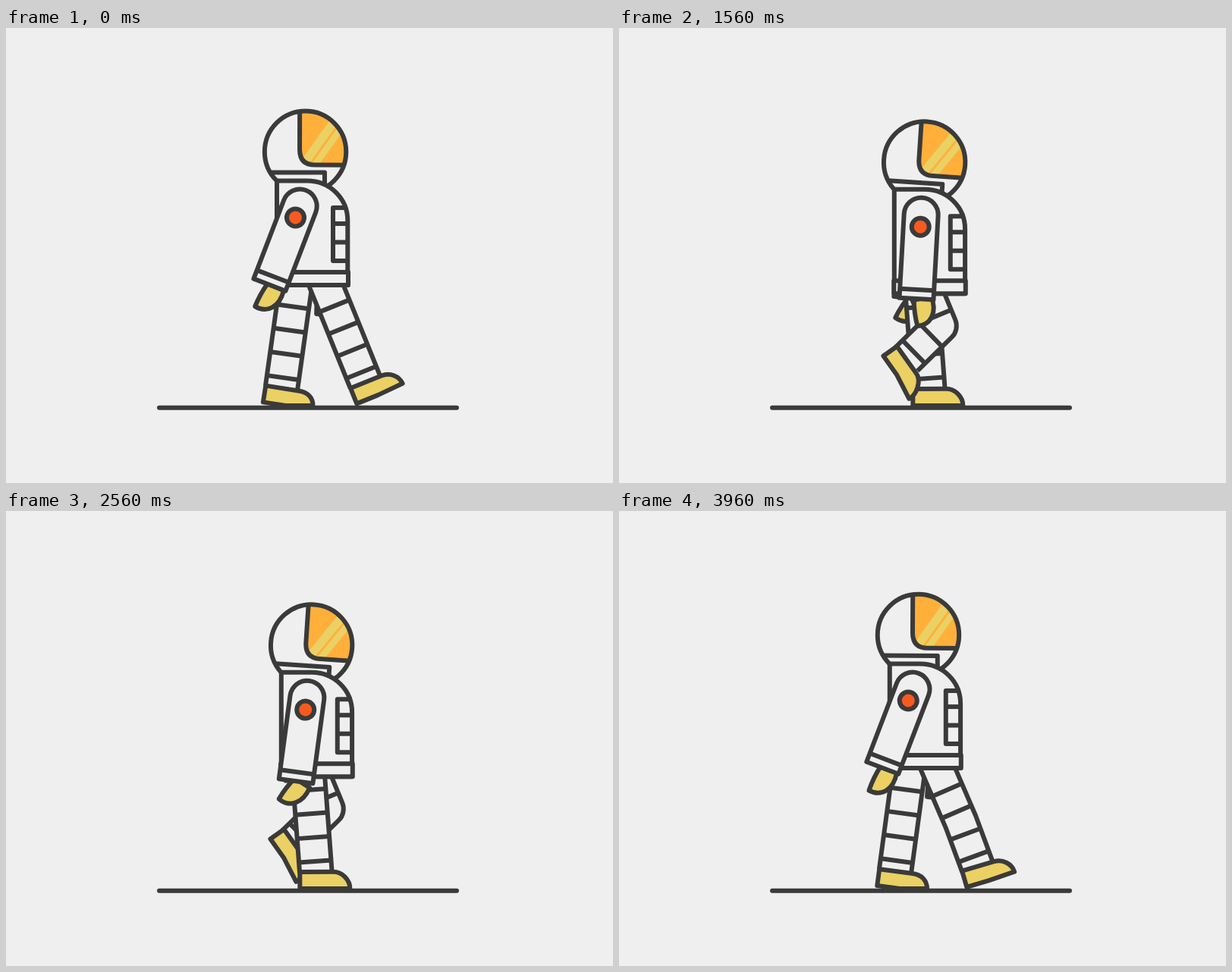
Animation of 800 by 600 pixels, one loop 4000 ms. Source, as an HTML page with a canvas:

```html
<!DOCTYPE html>
<html lang="en">
<head>
<meta charset="utf-8">
<title>Walking astronaut</title>
<style>
html, body { margin: 0; width: 100%; height: 100%; overflow: hidden; background: #efefef; }
canvas { display: block; }
</style>
</head>
<body>
<canvas id="stage" width="800" height="600"></canvas>
<script>
const ctx = document.getElementById('stage').getContext('2d');
const INK = '#3a3a3a', SUIT = '#efefef', YELLOW = '#ebd064', ORANGE = '#ffb03b', RED = '#f75a20';
const LOOP = 4000, CYCLE = 2000, STEP = 1000, LINE = 6, FLOOR = 498;
const TAU = Math.PI * 2;

const rad = deg => deg * Math.PI / 180;
const mod = (a, n) => ((a % n) + n) % n;
const clamp = v => Math.min(1, Math.max(0, v));
const ease = u => (1 - Math.cos(Math.PI * clamp(u))) / 2;
const swell = t => ease(2 * mod(t, STEP) / STEP <= 1 ? 2 * mod(t, STEP) / STEP : 2 - 2 * mod(t, STEP) / STEP);

function turn(x, y, deg) {
  const c = Math.cos(rad(deg)), s = Math.sin(rad(deg));
  return [x * c - y * s, x * s + y * c];
}

// A leg spends one step on the ground moving back, and one step swinging forward.
function gait(time) {
  const t = mod(time, CYCLE), swinging = t >= STEP, u = (t % STEP) / STEP;
  const arch = swinging ? Math.sin(Math.PI * u) : 0;
  const lift = arch ** 2.5;
  const travel = 0.85 * ease(u) + 0.15 * u;
  const reach = swinging ? travel : 1 - travel;

  const thigh = 8 - 30 * reach - 13 * arch;
  const shin = thigh + 70 * arch ** 1.5;
  const pitch = swinging ? shin + 9 * arch ** 0.4 : shin * Math.cos(Math.PI * u) ** 2;
  const toeFree = swinging ? clamp((u - 0.1) / 0.35) : Number(pitch < 0);

  // The sole rolls on the heel when tipped up and on the ball when tipped down.
  const roll = pitch < 0 ? -28 : 9;
  const soleDrop = turn(roll, 22, pitch)[1];
  return {
    x: 363 + 110.5 * reach - 52 * lift,
    y: FLOOR - soleDrop - 43 * lift,
    thigh, shin, pitch,
    toe: pitch * 1.15 * toeFree
  };
}

function nearArm(time) {
  const t = mod(time, LOOP);
  const swing = (from, to) => ease((t - from) / (to - from));
  return 21 - 37 * (swing(0, 1080) - swing(1080, 2020) + swing(2200, 3080) - swing(3080, 3980));
}

const farArm = t => 5 - 16 * Math.cos(TAU * (t - 90) / CYCLE);

function paint(fill) {
  if (fill) { ctx.fillStyle = fill; ctx.fill(); }
  ctx.strokeStyle = INK;
  ctx.lineWidth = LINE;
  ctx.stroke();
}

function polyline(points, width = LINE, color = INK) {
  ctx.beginPath();
  points.forEach(p => ctx.lineTo(p[0], p[1]));
  ctx.lineWidth = width;
  ctx.strokeStyle = color;
  ctx.stroke();
}

function drawFoot({ x, y, pitch, toe }) {
  const ball = turn(9, 22, pitch);
  const heel = (px, py) => turn(px, py, pitch);
  const tip = (px, py) => {
    const v = turn(px, py, toe);
    return [ball[0] + v[0], ball[1] + v[1]];
  };
  ctx.save();
  ctx.translate(x, y);
  ctx.beginPath();
  ctx.moveTo(...heel(-21, 0));
  ctx.lineTo(...heel(23, 0));
  ctx.bezierCurveTo(...heel(35, 0), ...tip(36, -11), ...tip(36, 0));
  ctx.lineTo(...ball);
  ctx.lineTo(...heel(-21, 22));
  ctx.closePath();
  paint(YELLOW);
  ctx.restore();
}

function drawLeg(t) {
  const pose = gait(t);
  const above = (p, dist, side, deg) => {
    const v = turn(side, -dist, deg);
    return [p[0] + v[0], p[1] + v[1]];
  };
  const ankle = [pose.x, pose.y];
  const knee = above(ankle, 63, 0, pose.shin);
  const bones = [above(knee, 100, 0, pose.thigh), knee, ankle];
  polyline(bones, 48.5);
  polyline(bones, 36.5, SUIT);
  for (const dist of [14, 45.5]) {
    for (const [joint, deg] of [[ankle, pose.shin], [knee, pose.thigh]]) {
      polyline([above(joint, dist, -21, deg), above(joint, dist, 21, deg)]);
    }
  }
  drawFoot(pose);
}

function drawHand(deg) {
  ctx.save();
  ctx.translate(5, 112);
  ctx.rotate(rad(deg));
  ctx.translate(-5, -112);
  ctx.beginPath();
  ctx.moveTo(-3, 110);
  ctx.quadraticCurveTo(-8, 126, -9, 144);
  ctx.bezierCurveTo(9, 148, 22, 134, 20, 112);
  ctx.closePath();
  paint(YELLOW);
  ctx.restore();
}

function drawArm(angle, t) {
  const deg = angle(t);
  ctx.save();
  ctx.translate(387.2 + (21 - deg) * 0.29, 235);
  ctx.rotate(rad(deg));
  // The hand trails the recent motion of the arm.
  drawHand(8.5 * (angle(t - 70) - angle(t - 30)));
  ctx.beginPath();
  ctx.arc(0, 0, 22.5, Math.PI, 0);
  ctx.lineTo(22.5, 111);
  ctx.lineTo(-22.5, 111);
  ctx.closePath();
  paint(SUIT);
  polyline([[-22.5, 99], [22.5, 99]]);
  ctx.beginPath();
  ctx.arc(0, 16, 11.5, 0, TAU);
  paint(RED);
  ctx.restore();
}

function drawTorso() {
  ctx.beginPath();
  ctx.moveTo(357, 201.5);
  ctx.lineTo(397, 201.5);
  ctx.bezierCurveTo(427, 201.5, 450.3, 225, 450.3, 254);
  ctx.lineTo(450.3, 339);
  ctx.lineTo(357, 339);
  ctx.closePath();
  paint(SUIT);
  ctx.beginPath();
  ctx.rect(356.5, 322, 94.5, 17);
  paint(SUIT);
  polyline([[450, 237], [431, 237], [431, 307], [450, 307]]);
  [258, 282.5].forEach(y => polyline([[431, y], [450, y]]));
}

function visorPath() {
  ctx.beginPath();
  ctx.moveTo(387, 100);
  ctx.lineTo(387, 160);
  ctx.quadraticCurveTo(387, 180.5, 407, 180.5);
  ctx.lineTo(460, 180.5);
}

function drawHelmet(t) {
  ctx.save();
  ctx.translate(357, 200);
  ctx.rotate(rad(3.8 * swell(t - 50)));
  ctx.translate(-357, -200);
  const shell = () => { ctx.beginPath(); ctx.arc(394.5, 163.2, 53.7, 0, TAU); };
  shell();
  ctx.fillStyle = SUIT;
  ctx.fill();

  ctx.save();
  ctx.clip();
  ctx.save();
  visorPath();
  ctx.lineTo(460, 100);
  ctx.closePath();
  ctx.fillStyle = ORANGE;
  ctx.fill();
  ctx.clip();
  polyline([[377.5, 200], [447.5, 102]], 11, YELLOW);
  polyline([[388, 207], [458, 109]], 8.5, YELLOW);
  ctx.restore();
  visorPath();
  paint();
  polyline([[340, 190.5], [420, 190.5], [420, 210]]);
  ctx.restore();

  shell();
  paint();
  ctx.restore();
}

function draw(t) {
  ctx.fillStyle = SUIT;
  ctx.fillRect(0, 0, 800, 600);
  ctx.lineJoin = 'round';
  ctx.lineCap = 'butt';
  const onBody = part => {
    ctx.save();
    ctx.translate(7 * swell(t + 60) - 0.25, 11.8 * swell(t + 10));
    part();
    ctx.restore();
  };
  onBody(() => drawArm(farArm, t));
  drawLeg(t + STEP);
  drawLeg(t);
  onBody(() => {
    drawHelmet(t);
    drawTorso();
    drawArm(nearArm, t);
  });
  ctx.lineCap = 'round';
  polyline([[202, 500.7], [594, 500.7]]);
}

const start = performance.now();
function tick() {
  draw((performance.now() - start) % LOOP);
  requestAnimationFrame(tick);
}
tick();
</script>
</body>
</html>
```
